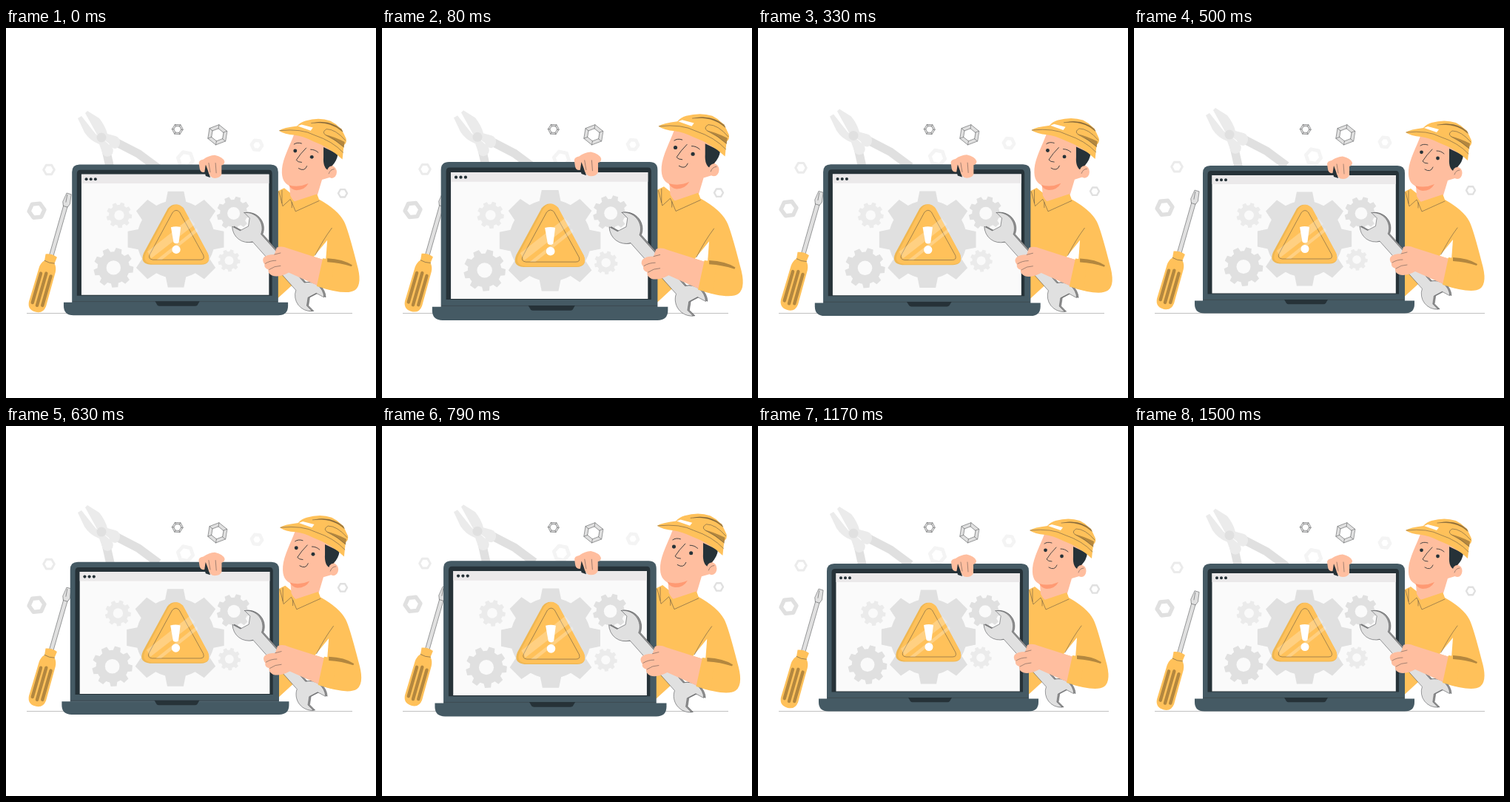
Write an HTML page that moves like this. It is 500 by 500 pixels and loops after 1.54 s.

```html
<!DOCTYPE html>
<html lang="en">
<head>
<meta charset="utf-8">
<title>Laptop repair</title>
<style>
html, body { margin: 0; height: 100%; overflow: hidden; background: #fff; }
svg { display: block; width: 100vw; height: 100vh; }
.line { fill: none; stroke: #37393c; stroke-width: .45; stroke-linecap: round; stroke-linejoin: round; }
.slate { fill: #455a64; }
.dark { fill: #263238; }
.gold { fill: #ffc15a; }
.brown { fill: #b3873f; }
.skin { fill: #ffbe9f; }
.steel { fill: #e0e0e0; }
.pale { fill: #ebebeb; }
</style>
</head>
<body>
<svg viewBox="0 0 500 500">
  <line id="floor" x1="28" y1="385.5" x2="468" y2="385.5" stroke="#b9b9b9" stroke-width=".9"/>
  <g id="fixedNuts"></g>

  <g id="floating">
    <g id="pliers">
      <g fill="none" stroke="#e0e0e0" stroke-width="11.5">
        <path d="M150 155L179 170L206 190"/>
        <path d="M135 164L143 200"/>
      </g>
      <path class="pale" d="M97 122L102 119L121 143L134 153L143 161A7 7 0 0 1 131 171L126 157Q113 152 106 141Z"/>
      <path class="pale" d="M107 115L110 112L126 122Q134 132 137 143L148 146A9 9 0 0 1 148 163Q141 163 139 156L123 144Z"/>
      <circle class="steel" cx="129" cy="148" r="6.5"/>
    </g>
    <g id="screwdriver" transform="translate(85.5 223) rotate(16)">
      <path class="steel" d="M-2.8 17H2.8V90H-2.8Z"/>
      <path class="line" d="M-2.8 17V88M2.8 17V88"/>
      <path class="steel" d="M-3 1L3 1L5 14L3 19H-3L-5 14Z"/>
      <path class="line" d="M-3 1L3 1L5 14L3 19H-3L-5 14ZM-2 3L-1 13"/>
      <path class="gold" d="M-8 88Q0 85 8 88L7 97Q11 101 11.5 108L12 156Q11 167 0 167Q-11 167 -12 156L-11.5 108Q-11 101 -7 97Z"/>
      <path class="line" d="M-7 97Q0 99 7 97"/>
      <path d="M-7 115V156M0 113V158M7 115V156" stroke="#b3873f" stroke-width="4.4" stroke-linecap="round"/>
    </g>
  </g>

  <g id="scene">
    <g id="worker">
      <path class="gold" d="M360 224L374 217L384 225L417 224L420 232Q445 246 453 261Q458 270 470 317Q478 344 468 352Q457 360 417 347L413 325L384 346L360 368Z"/>
      <path d="M431 286L413 308L429 313Z" fill="#fff"/>
      <path class="skin" d="M387 146C382 160 372 178 371 192C370 206 375 211 381 214L382 227Q386 235 390 236L418 226L424 206L434 203L443 170L415 142Z"/>
      <path d="M380 213Q393 217 406 211Q401 220 390 220Q383 219 380 213Z" fill="#ff9a73"/>
      <path class="gold" d="M368 221L374 218L381 231L372 241ZM384 236L417 225L420 234L389 248Z"/>
      <path class="line" d="M367 222L372 241L382 232L384 236L389 248L420 234M371 220V237M384 236V243M437 270Q425 286 415 306"/>
      <path class="dark" d="M426 163L445 172Q444 181 437 188L433 194Q425 191 426 176Z"/>
      <ellipse class="skin" cx="437" cy="196" rx="6.5" ry="8"/>
      <path class="line" d="M433 198Q435 192 440 192"/>
      <circle cx="388.5" cy="167.8" r="2.4" class="dark"/>
      <circle cx="410.5" cy="176" r="2.4" class="dark"/>
      <path class="line" style="stroke-width:.9" d="M387 159Q391 156 397 158M409 166Q415 166 419 170M403 164Q395 172 390 180Q392 183 397 183M393 191Q401 196 404 188"/>
      <path class="gold" d="M367 141Q373 137 391 135Q395 130 402 128Q420 123 435 128Q450 135 456 152Q457 158 453 160L451 179Q434 163 412 155Q398 148 388 147Q374 146 367 141Z"/>
      <path d="M392 135L397 133L412 137L409 141Z" fill="#fff"/>
      <path class="brown" d="M412 131Q434 126 450 139L452 143Q436 129 412 131ZM427 146Q440 149 454 156L453 163Q437 150 427 146Z"/>
      <path class="line" d="M368 141Q397 138 414 147Q438 155 452 170M410 131Q435 126 451 142M455 154Q442 139 430 139Q423 143 429 147Q442 153 453 163"/>
    </g>

    <g id="laptop">
      <path class="slate" d="M93 369V196Q93 186 103 186H356Q366 186 366 196V369Z"/>
      <path class="dark" d="M99.5 359.5V198Q99.5 193 104 193H354Q358 193 358 198V359.5Z"/>
      <path d="M105.5 199H353.8V358.5H105.5Z" fill="#fafafa"/>
      <path d="M105.5 199H353.8V211H105.5Z" fill="#ebe9ea"/>
      <g class="dark"><circle cx="112" cy="205.3" r="2"/><circle cx="118" cy="205.3" r="2"/><circle cx="124" cy="205.3" r="2"/></g>
      <path class="slate" d="M82 368.5H379V373Q379 385.5 366 385.5H95Q82 385.5 82 373Z"/>
      <path class="line" d="M94 367.3H365"/>
      <path class="dark" d="M203 367H262L259 372Q258 373.3 256 373.3H209Q207 373.3 206 372Z"/>
    </g>
    <g id="gears"></g>

    <g id="warning">
      <path d="M220 244Q229 234 240 243L273 304Q278 318 264 318.5H197Q182 317 188 303Z" fill="#efb752"/>
      <path class="gold" d="M222 245Q231 233 241 244L273 304Q278 317 264 317.5H200Q185 316 191 303Z"/>
      <path class="line" d="M226.5 249Q231 244 235.5 249L267 306Q269 312 263 312H200Q193 311 196 305Z"/>
      <path d="M193 301L249 257L256 265L198 310ZM205 312L258 270L260 274L212 312Z" fill="#fff" opacity=".24"/>
      <path d="M224 269Q231 267 237 269L234.5 289Q231 292 227.5 289Z" fill="#fff"/>
      <circle cx="231" cy="298.5" r="5.5" fill="#fff"/>
    </g>

    <path class="dark" d="M267 188L272 186L276 203L270 201Z"/>
    <path class="skin" d="M261 184Q261 180 267 179Q274 174 282 173.5Q293 176 295 182Q295 186 291 187L291 199Q289 204 282 204Q275 204 273 194L270 186L268.5 196Q263 197 262 191Z"/>
    <path class="line" d="M274 184L276 196M283 184L284 197"/>

    <g id="wrench"></g>
    <path class="skin" d="M347 309Q351 305 361 305L364 296Q370 293 379 297L426 312L418 346L380 329Q367 336 358 333Q352 330 353 325Q347 323 348 318Q344 313 347 309Z"/>
    <path class="line" d="M349 317Q355 313 363 313M354 325Q361 320 369 320M361 305L369 303"/>
    <path class="gold" d="M425 310L440 312L436 352L417 347Z"/>
    <path class="brown" d="M431 310Q452 311 464 319L463 321Q448 316 431 315Z"/>
  </g>
</svg>
<script>
const LOOP = 1540;
const byId = id => document.getElementById(id);
const polar = (x, y, r, a) => `${(x + r * Math.cos(a)).toFixed(2)} ${(y + r * Math.sin(a)).toFixed(2)}`;
const hexPoints = (x, y, r, turn) =>
  Array.from({ length: 6 }, (_, i) => polar(x, y, r, turn + i * Math.PI / 3));

function gear(x, y, r, hole, color, teeth, turn = 0) {
  const root = r * .8, tip = 1.32 / teeth, base = 2.1 / teeth;
  let d = "";
  for (let i = 0; i < teeth; i++) {
    const a = turn + i * 2 * Math.PI / teeth;
    d += `${i ? `A${root} ${root} 0 0 1 ` : "M"}${polar(x, y, root, a - base)}` +
      `L${polar(x, y, r, a - tip)}L${polar(x, y, r, a + tip)}L${polar(x, y, root, a + base)}`;
  }
  return `<path d="${d}A${root} ${root} 0 0 1 ${polar(x, y, root, turn - base)}Z" fill="${color}"/>` +
    `<circle cx="${x}" cy="${y}" r="${hole}" fill="#fafafa"/>`;
}

function nut(x, y, r, hole, color, turn, outlined) {
  const ring = hexPoints(x, y, (r + hole) / 2, turn);
  let s = `<polygon points="${ring}" fill="none" stroke="${color}" stroke-width="${r - hole}" stroke-linejoin="round"/>`;
  if (outlined) {
    const outer = hexPoints(x, y, r, turn), inner = hexPoints(x, y, hole, turn);
    s += `<path class="line" d="M${outer.join("L")}ZM${inner.join("L")}Z` +
      outer.map((p, i) => `M${p}L${inner[i]}`).join("") + `"/>`;
  }
  return s;
}

byId("gears").innerHTML =
  gear(230.5, 285, 64.5, 20, "#e0e0e0", 8) +
  gear(155.5, 253, 17, 6.5, "#ebebeb", 9, .1) +
  gear(148, 322.5, 26.5, 9.5, "#e0e0e0", 9, .1) +
  gear(307, 250.5, 22.5, 8.3, "#e0e0e0", 9, .1) +
  gear(301, 313, 14.8, 5.8, "#ebebeb", 9, .1);

byId("fixedNuts").innerHTML =
  nut(231.7, 137, 7.4, 4.9, "#e0e0e0", .05, true) +
  nut(285.7, 144.3, 13.8, 8.6, "#e0e0e0", .68, true);

byId("floating").insertAdjacentHTML("afterbegin",
  nut(41.5, 246.7, 13.2, 7.8, "#e0e0e0", -.1) +
  nut(58, 191.5, 8.8, 5.8, "#ebebeb", 0) +
  nut(242.5, 177.5, 12.8, 8, "#f4f4f4", .2) +
  nut(339, 158.3, 9.5, 5, "#f4f4f4", .1) +
  nut(455, 223.3, 7.2, 4.8, "#e0e0e0", 0));

const wrenchPath = "M-17 -10L-7 -10.5L0 -2L-3 10L-14 14A21 21 0 0 0 19 7.5" +
  "L105 7.5A21 21 0 0 0 140 10L130 10.5L123 2L126 -10L137 -14A21 21 0 0 0 105 -7.5" +
  "L19 -7.5A21 21 0 0 0 -17 -10Z";
byId("wrench").innerHTML = [[2.2, -.2, "#969696"], [0, 0, "#e0e0e0"]].map(([dx, dy, color]) =>
  `<path class="line" style="fill:${color}" transform="translate(${325 + dx} ${269 + dy}) rotate(48.2)" d="${wrenchPath}"/>`).join("");

// Two linear beats, then a rest: [time, extra scale]
const beats = [[0, .02], [124, .1], [406, 0], [583, 0], [725, .1], [868, 0], [1510, 0], [LOOP, .02]];

function beatAt(t) {
  const i = beats.findIndex(([end]) => end > t);
  const [t0, a] = beats[i - 1], [t1, b] = beats[i];
  return a + (b - a) * (t - t0) / (t1 - t0);
}

function draw(now) {
  const t = now % LOOP, growth = beatAt(t);
  const lift = 6 * (1 - Math.abs(2 * t / LOOP - 1));
  byId("scene").setAttribute("transform", `translate(277.5 255) scale(${1 + growth}) translate(-277.5 -255)`);
  byId("floating").setAttribute("transform", `translate(0 ${-lift})`);
  byId("floor").setAttribute("x2", growth < .005 ? 474 : 468);
}

const start = performance.now();
function tick() {
  draw(performance.now() - start);
  requestAnimationFrame(tick);
}
tick();
</script>
</body>
</html>
```
